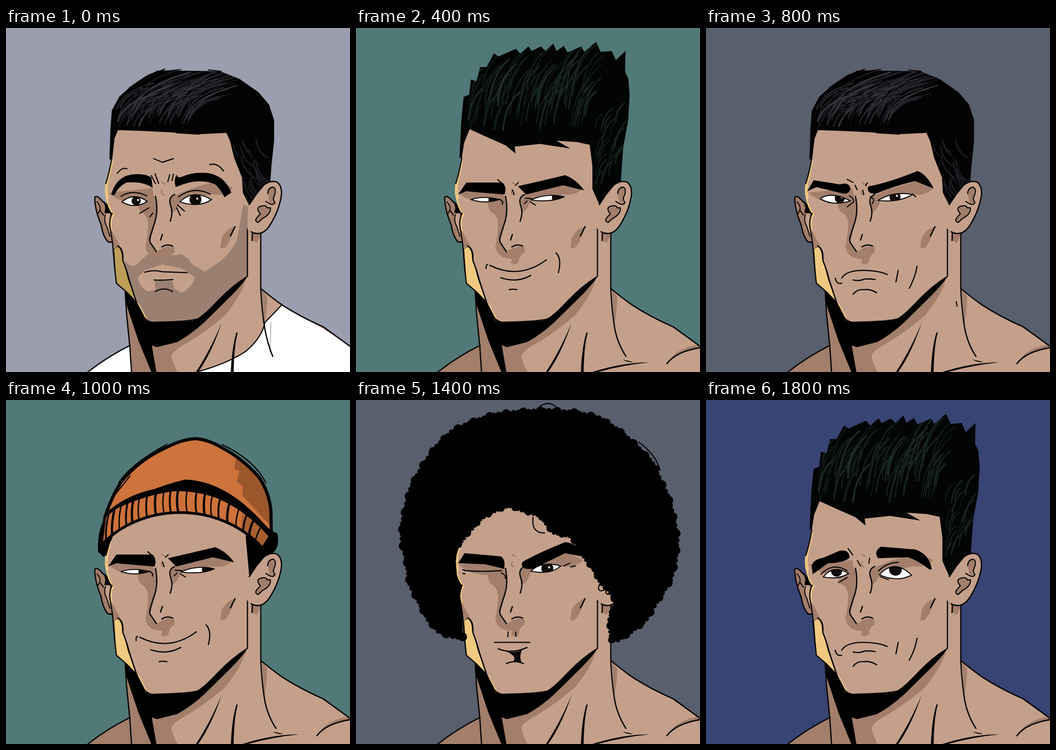
An HTML page with a canvas that plays this animation: 748x748 px, repeating every 2000 ms.

```html
<!DOCTYPE html>
<html lang="en">
<head>
<meta charset="utf-8">
<title>Portraits</title>
<style>
html, body { margin: 0; width: 100%; height: 100%; overflow: hidden; }
canvas { display: block; }
</style>
</head>
<body>
<canvas id="stage" width="748" height="748"></canvas>
<script>
const c = document.getElementById('stage').getContext('2d');
const INK = '#080606';
c.lineJoin = c.lineCap = 'round';

const fill = (color, d) => { c.fillStyle = color; c.fill(new Path2D(d)); };
const line = (d, width = 2.8, color = INK) => {
  c.lineWidth = width; c.strokeStyle = color; c.stroke(new Path2D(d));
};
const shape = (color, d, width) => { fill(color, d); line(d, width); };
const dot = (x, y, r, color) => {
  c.fillStyle = color; c.beginPath(); c.arc(x, y, r, 0, 7); c.fill();
};
const inside = (d, draw) => { c.save(); c.clip(new Path2D(d)); draw(); c.restore(); };
const bumps = (d, size, gap, color = '#000') => {
  c.setLineDash([0, gap]); line(d, size, color); c.setLineDash([]);
};
const seeded = s => () => (s = s * 16807 % 2147483647) / 2147483647;

const human = { base: '#c4a08b', shade: '#a27e6b', beard: '#9b8071', gold: '#efc97f', dimGold: '#bd9e58' };
const teal = { base: '#87b6b8', shade: '#649494', beard: '#688e90', gold: '#e6b776', dimGold: '#bd9d63' };

const JAW = 'M525 436L525 540Q490 562 462 592Q432 624 418 632Q405 638 318 640Q306 638 301 630L284 597';
const TEMPLE = 'M230 282Q228 305 219 332Q214 352 219 370Q222 390 232 403Q222 420 228 442';

function body({ base, shade }, shirt) {
  fill(shirt ? '#fff' : shade, 'M178 748Q220 715 270 690L275 748Z');
  fill(base, 'M258 560L300 450L554 440L555 568Q576 585 600 602Q640 628 690 650L748 692L748 748L273 748L269 690Z');
  fill(shade, 'M260 570L525 530Q520 572 476 625Q440 657 392 686Q358 704 360 716Q364 732 373 748L273 748L269 690Z');
  fill(shade, 'M556 568L568 584Q568 610 562 645ZM532 442L553 450L546 467L534 462Z');
  fill('#000', 'M258 570L284 597L303 636L318 640L405 637Q425 632 455 599Q490 562 525 540Q518 553 490 582L430 641Q400 668 372 683L328 694L317 690L327 748L316 748L288 680L262 602Z');
  if (shirt) {
    fill('#fff', 'M600 602Q582 624 563 642Q556 675 520 704Q480 730 415 748L748 748L748 692Q690 652 640 626Z');
    line('M600 602L563 640Q556 675 520 704Q480 730 415 748', 2.4);
    line('M576 640L574 705M491 724L489 748', 3, '#c9c9cb');
  } else {
    fill(shade, 'M748 688Q715 692 692 710L676 730Q695 704 748 697Z');
    line('M676 730Q695 704 748 695');
    fill(INK, 'M638 727Q580 727 514 748L526 748Q580 733 638 727ZM580 721L603 726Q590 728 580 721Z');
  }
  line('M178 748Q220 715 270 690M259 570L262 620L269 690L273 748');
  line('M554 448L554 568Q556 610 562 650Q568 685 ' + (shirt ? '580 714' : '587 714'));
  line('M556 568Q576 585 600 602Q640 628 690 650L748 692');
  fill(INK, 'M469 641Q448 705 418 748L413 748Q444 701 469 641ZM504 662Q496 690 495 748L489 748Q491 695 501 662Z');
}

function leftEar({ base, shade }) {
  shape(shade, 'M232 466L222 465Q211 454 207 428Q193 395 193 368Q198 362 211 378L228 392Z');
  fill(base, 'M225 400L216 408Q214 420 226 455Z');
  fill('#000', 'M212 376L229 390L227 403L214 402L216 391Z');
  line('M198 378Q207 388 204 396L200 404M204 396L212 407M216 406Q212 420 219 431L226 453', 2.2);
}

function rightEar({ base, shade }) {
  const rim = 'M529 384L545 360L560 342Q575 330 589 335Q600 342 599 362Q595 394 575 427Q557 456 533 443';
  fill(base, rim + 'L525 438L526 384Z');
  line(rim);
  fill(shade, 'M569 360Q572 345 582 346Q590 350 582 367L583 382L573 380ZM553 404Q541 390 556 388L573 391Q576 403 548 424Q540 415 553 404Z');
  line('M569 360Q570 347 581 346Q590 350 582 368Q580 374 585 379Q581 389 565 377M553 404Q541 390 556 387Q566 385 568 391L575 391Q576 405 558 414L548 423Q540 420 545 413Z', 2.4);
}

function face({ base, shade, beard, gold, dimGold }, bearded, lips) {
  fill(base, 'M230 282L240 215L490 215L518 260L532 384L533 443L525 436L525 540Q490 562 462 592Q432 624 418 632Q405 638 318 640L301 630L284 597L240 555L232 470L228 442Q222 420 232 403Q214 375 215 352Z');
  fill(shade, 'M286 376L322 366Q333 395 323 425L314 465L328 487Q345 473 366 475L367 488Q354 495 354 509Q345 517 337 511L340 502Q306 502 303 474Q311 440 308 418Q304 404 293 400Q286 390 286 376Z');
  fill(shade, 'M223 358L318 348L322 368L300 380Q250 384 223 358Z');
  fill(shade, 'M358 368L400 350L460 332L494 348Q478 366 450 362L380 375Q372 398 360 402Z');
  fill(shade, 'M498 432Q481 435 469 456L466 479L475 479Q488 466 498 432ZM230 440L233 478L248 473Z');
  if (bearded) {
    fill(beard, 'M516 384L528 388L525 540Q490 562 462 592Q432 624 418 632L318 640L301 630L268 552L258 505Q270 522 282 516L308 492L338 503L354 495L382 492Q398 500 405 514L432 530L465 508Q500 478 504 450Z');
    fill(base, 'M287 542L303 526L340 514L380 522L410 541Q409 560 382 576L366 567L362 550L323 550L325 569L308 573Q288 560 287 542Z');
  }
  if (lips) fill(shade, 'M297 531Q315 519 334 517L348 525L370 521L391 531Q340 522 297 531ZM319 549L366 549L363 572L326 576L330 564Z');
  line(TEMPLE, 3, gold);
  line('M231 290Q228 308 221 334Q218 354 222 370M234 404Q225 420 230 440M288 600L304 631', 3, gold);
  shape(bearded ? dimGold : gold, 'M235 480L243 475Q253 482 253 502L260 523L265 544L284 597L262 574L240 555Z', 1);
  line('M230 282Q226 310 217 338M231 403Q222 420 228 442L232 470L236 520L240 555L262 574L284 597', 2.6);
  line('M243 474Q256 480 254 505Q263 528 268 548L284 597', 2.8);
  line(JAW, 2.6);
  line('M367 362Q352 368 358 386Q364 402 357 420M325 366Q332 400 322 427L314 452Q310 463 316 470L327 486M340 449L336 461M339 476Q350 469 362 474M498 432L488 452M536 446L535 462');
}

const EXPRESSIONS = {
  wary: {
    brows: 'M229 362Q240 320 280 318Q302 316 316 325L319 348Q300 333 262 336Q245 344 235 364ZM371 319Q364 330 369 346Q418 324 455 340Q467 351 475 368L490 358Q475 319 435 315Q405 313 381 324Q374 327 371 319Z',
    eyes: [['M252 378Q278 356 307 377Q280 395 252 378Z', 283, 376, 10], ['M378 378Q407 350 447 373Q420 392 378 378Z', 412, 373, 13]],
    marks: 'M250 366Q275 350 306 365M375 367Q408 343 444 361M321 284L340 292L364 284M242 316Q252 302 263 306M443 297Q460 292 473 311M316 321L325 338M324 317L332 338M352 334L356 319M361 332L364 318M291 403L311 391M313 411L319 402M373 385L388 398M371 391L379 408'
  },
  stern: {
    brows: 'M220 355L234 331L291 340Q312 334 314 350Q310 365 290 358L240 346ZM355 344Q395 337 460 311Q480 318 495 349L455 333Q420 340 370 360Q350 362 352 346Z',
    eyes: [['M248 371Q273 354 314 376Q275 388 248 371Z', 291, 370, 11], ['M374 375Q407 354 449 362Q420 380 374 375Z', 411, 367, 12]],
    marks: 'M307 329L320 336M324 342L329 352M351 337L347 343M341 353L343 362M312 365Q322 370 321 378L307 389M357 367Q370 372 361 382M449 361L456 367M544 595L546 605'
  },
  sleepy: {
    brows: 'M217 353L235 332L310 341L323 367L270 358L225 357ZM383 340L455 331Q482 334 496 363L475 360L385 363Q366 360 373 343Z',
    eyes: [['M263 380Q290 370 321 375Q300 390 263 380Z', 291, 379, 10], ['M380 375Q410 365 448 375Q415 387 380 375Z', 411, 376, 11]],
    marks: 'M309 291Q333 294 345 302Q360 294 383 291M290 303Q327 303 345 312Q365 307 392 310M250 381L260 371M246 391L259 384M302 393L316 386M447 378L455 383M458 377L463 382M383 385L396 393'
  },
  sly: {
    brows: 'M222 362L240 336L315 336Q330 343 323 362L285 359L240 355ZM352 344L400 333L455 320Q480 330 496 353L450 342L370 362Z',
    eyes: [['M250 373Q280 364 311 373Q280 383 250 373Z', 299, 373, 11], ['M380 374Q415 358 453 367Q425 380 380 374Z', 438, 369, 12]],
    marks: 'M308 330L321 340M311 372Q322 377 318 383M353 336L347 342M340 352L344 362M366 382L372 376M379 378L390 385M368 370L382 371'
  },
  tired: {
    brows: 'M225 360L229 335Q265 323 303 318Q316 327 308 343L245 342L235 364ZM368 315Q358 325 367 338L440 336Q463 344 488 360L494 350Q475 325 450 317Z',
    eyes: [['M250 370Q280 347 309 372Q280 387 250 370Z', 290, 369, 11], ['M376 372Q408 342 449 362Q422 386 376 372Z', 414, 366, 13]],
    marks: 'M321 319L328 327M333 333L336 338M353 317L347 326M313 358Q324 362 321 369M311 369L317 377M233 385L242 379M236 374L242 370M361 371L369 376M463 361L474 361'
  },
  wink: {
    brows: 'M222 355L236 333L315 340Q326 347 322 367L280 357ZM362 352Q395 333 455 309Q485 312 490 340L455 333L385 367Q355 370 362 352Z',
    eyes: [['M380 372Q405 349 445 361Q423 381 380 372Z', 416, 366, 13]],
    marks: 'M236 371Q275 374 316 371M232 377L237 378M232 369L236 370M316 376Q326 380 325 388M451 361L465 355M467 363L477 361M331 504L330 515M347 505L348 514'
  },
  bored: {
    brows: 'M230 365Q228 348 255 343L290 328Q312 324 312 343Q300 354 265 355L232 379ZM380 319Q364 330 374 344L440 342Q462 350 485 368L491 369Q486 335 455 325Z',
    eyes: [['M255 385Q276 357 310 377Q290 391 255 385Z', 284, 372, 12], ['M377 380Q410 344 447 381Q415 397 377 380Z', 412, 368, 14]],
    marks: 'M250 379Q275 352 307 371M375 372Q392 354 418 353M309 323L319 337M329 349L336 361M356 344L354 355M288 397L307 386M379 384L397 391'
  }
};

const MOUTHS = {
  flat: 'M302 531Q320 525 340 530L394 532M322 548Q342 549 363 547M325 573Q343 562 362 573',
  frown: 'M295 544Q308 523 360 528Q382 530 394 536M281 544Q284 558 295 555M320 548Q334 551 344 546Q355 545 368 547M320 579Q328 567 345 569Q358 567 371 576M418 527L413 552M459 518Q455 542 442 566',
  smile: 'M291 516Q355 548 414 504M283 523Q282 515 286 514M315 543Q350 555 380 538M333 569Q341 567 350 569M435 489Q448 502 440 532',
  calm: 'M309 534Q326 524 360 528L394 528M329 549Q344 537 357 550',
  pout: 'M301 527L378 527M309 541Q340 553 372 538M327 573Q345 565 364 573'
};

function express(name, mouth, shade) {
  const { brows, eyes, marks } = EXPRESSIONS[name];
  for (const [lid, x, y, r] of eyes) {
    inside(lid, () => {
      c.fillStyle = '#fff'; c.fillRect(0, 300, 748, 150);
      dot(x, y, r, '#100b0a');
      if (name != 'sly' && name != 'bored') dot(x + 4, y - 2, 2.2, '#fff');
    });
    line(lid, 2.2);
  }
  fill('#000', brows);
  line('M339 336L346 340M340 352Q335 360 343 363', 3, shade);
  line(marks, 2.4);
  line(MOUTHS[mouth], 2.6);
  if (mouth == 'pout') fill(INK, 'M322 545Q340 552 361 544Q354 558 360 571L342 568Q352 556 322 545Z');
}

function strands(d, colors, count, x0, x1, y0, y1, dx, dy) {
  const rnd = seeded(77);
  inside(d, () => {
    for (let i = 0; i < count; i++) {
      const x = x0 + rnd() * (x1 - x0), y = y0 + rnd() * (y1 - y0), k = .5 + rnd() * .7;
      line(`M${x} ${y}q${dx * k * .15} ${dy * k * .7} ${dx * k} ${dy * k}`, 1 + rnd() * 2.5, colors[i % colors.length]);
    }
  });
}

const SLICK = 'M226 285L228 220L231 180L247 150L275 125L308 103L335 93L400 94L465 95L508 112L548 140L571 167L582 200L582 245L576 302L574 332L559 342L529 384L516 358L514 325L497 282L488 245L480 227L420 230L360 226L300 223L243 221L235 240L230 285Z';
const QUIFF = 'M225 282L229 200L234 150L246 145L250 112L262 116L270 85L284 85L300 55L310 62L348 45L357 56L375 40L382 50L402 40L412 50L429 34L436 50L452 39L460 53L490 40L496 52L522 30L532 52L556 50L565 70L586 50L585 95L592 110L595 145L592 200L581 260L576 332L560 342L529 384L514 350L514 300L508 254L480 248L436 245L466 262L400 252L345 258L347 273L325 255L280 235L247 220L235 250L230 282Z';
const SPIKES = 'M221 320L193 289L222 283L205 262L167 230L216 234L180 181L234 187L194 118L247 140L231 96L281 123L267 42L335 103L338 53L372 87L379 46L411 98L445 29L458 101L480 52L488 107L534 68L530 118L571 97L556 159L590 138L584 168L607 168L581 217L617 222L593 250L623 268L600 289L610 295L597 310L607 321L588 334L560 342L529 384L516 357L523 340L511 285L475 249L350 274L320 269L254 250L238 280Z';
const CROWN = 'M221 244L280 116Q360 76 445 84Q500 99 541 136L590 276Q490 204 400 204Q310 208 221 244Z';
const BRIM = 'M221 244Q310 208 400 204Q490 204 590 276Q624 312 638 362Q520 246 400 247Q260 247 163 326Q188 275 221 244Z';
const CAP = 'M235 206Q236 130 300 97Q380 65 490 80Q545 105 580 165Q590 220 572 311L500 245Q380 190 235 206Z';
const VISOR = 'M234 205Q193 214 194 248Q198 284 240 281Q340 250 440 273Q500 287 572 312L500 246Q365 178 234 205Z';
const AFRO = 'M232 515L214 515L180 503L156 475L141 445L118 402L111 350L101 312L101 272L109 232L121 188L146 143L174 103L210 68L248 50L302 32L360 26L415 23L480 28L528 39L570 66L605 96L643 136L665 183L679 213L689 252L698 300L694 350L683 392L654 437L629 479L596 504L568 522L555 522';
const HAIRLINE = 'L550 480L564 440L550 413L532 398L517 370L496 342L468 297L427 288L401 252L366 242L332 230L298 243L272 258L245 288L221 318';

const HATS = {
  slick: {
    front() {
      shape('#030304', SLICK, 2);
      strands(SLICK, ['#24242b', '#17171c', '#35353b'], 70, 240, 400, 170, 215, 120, -85);
      strands(SLICK, ['#1d1d23'], 26, 495, 545, 240, 350, 30, 45);
      line('M315 103L345 89M340 95L380 90M440 91L468 94M285 118L330 93M233 180L270 128M370 228L420 231', 2);
    }
  },
  quiff: {
    front() {
      fill('#030504', QUIFF);
      strands(QUIFF, ['#15241f', '#0e1715', '#1c2d27'], 90, 240, 500, 130, 225, 42, -95);
      strands(QUIFF, ['#15241f'], 24, 520, 565, 200, 340, 24, -50);
    }
  },
  bucket: {
    back() {
      fill('#000', 'M163 326Q142 350 147 372Q170 412 205 417L240 400L500 300L540 420L585 417Q635 415 643 383L637 360L520 246L300 240Z');
      fill('#000', 'M550 440L578 418Q595 440 580 470Q570 500 577 545Q552 525 553 490Z');
      line('M580 430q28 20 5 38M582 455q40 10 10 32q-15 8 -20 0M570 475q10 38 36 28M565 500q6 24 28 24', 2.5);
    },
    front() {
      fill('#66513f', 'M330 284Q385 262 425 250L487 260L502 301Q420 274 330 284Z');
      fill('#000', 'M163 326Q250 240 400 240Q450 245 500 262L590 300L620 345L560 342L529 384L517 350L497 278L480 262L430 255L425 276L400 280L375 268L350 276L340 258L310 258L290 270L270 268L240 305L220 330L215 370L180 365Z');
      for (let i = 0; i < 11; i++) {
        const x = 246 + i * 18, y = 278 + 10 * Math.sin(i * 2.1);
        line(`M${x - 12} ${y - 14}q-4 30 16 26q18 -2 14 -22`, 4 + i % 3);
      }
      fill('#5b4cc8', CROWN);
      inside(CROWN, () => {
        fill('#4235a1', 'M420 80L470 95L490 115L484 127L502 128L478 147L510 148L495 161L518 165L440 152L520 178L450 180L526 190L495 203L530 215L525 232L600 280L560 130L470 70Z');
        line('M227 240L278 130', 3, '#8a80e6');
      });
      fill('#3d3098', BRIM);
      inside(BRIM, () => fill('#251a79', 'M430 200L495 222L462 228L490 240L475 256L650 370L600 270Z'));
      line(CROWN, 4.5);
      line(BRIM, 2.5);
    }
  },
  cap: {
    back() {
      const tufts = 'M222 290Q195 315 196 350L202 366L225 365ZM224 458Q208 470 214 488L236 506ZM556 514Q575 516 588 488Q602 455 597 410L560 420Z';
      fill('#75491f', tufts);
      bumps(tufts, 4, 5, '#1c1008');
    },
    front() {
      const side = 'M514 303L560 305L594 327L592 336L560 342L529 384L516 352Z';
      fill('#7d4f26', side);
      line('M530 318L575 325M527 335L560 330M528 350L545 345', 5, '#99652f');
      bumps(side, 5, 5);
      fill('#438637', CAP);
      inside(CAP, () => {
        fill('#2a5f25', 'M440 76Q500 95 505 150Q510 205 498 246L575 315L600 160L500 76Z');
        line('M365 200Q370 120 400 82M300 190Q320 120 370 82M430 205Q445 140 430 82M270 150Q290 110 340 88M540 260Q552 180 520 110', 1.4, '#568f55');
        line('M241 204Q240 175 258 148', 5, '#78a9bd');
      });
      line(CAP, 5);
      fill('#000', VISOR);
      line('M295 273Q335 267 380 271M300 276L345 270', 1.5);
    }
  },
  beanie: {
    front() {
      const cubic = (a, b, p, q) => t => ((1 - t) ** 3 * a + 3 * t * (1 - t) ** 2 * b + 3 * t * t * (1 - t) * p + t ** 3 * q);
      const topX = cubic(215, 290, 450, 578), topY = cubic(252, 185, 155, 290);
      const lowX = cubic(207, 290, 460, 558), lowY = cubic(316, 225, 215, 322);
      const dome = 'M216 252Q232 205 252 176Q290 130 345 105Q380 86 412 84Q440 86 470 104Q515 128 550 168Q572 200 576 240L577 298C450 150 290 180 216 252Z';
      const cuff = 'M215 252C290 185 450 155 578 290L558 322C460 215 290 225 207 316Z';
      fill('#000', 'M212 262Q198 290 200 330L213 342L232 298ZM565 280L590 290Q596 320 580 333L560 342L529 384L521 295Z');
      fill('#ce733c', dome);
      inside(dome, () => fill('#9b562b', 'M484 118L500 128L496 150L508 154L502 178L515 188L514 208L600 300L590 180Z'));
      fill('#cd713a', cuff);
      inside(cuff, () => {
        fill('#a85f30', 'M515 220L510 300L580 340L600 270Z');
        for (let i = 1; i < 22; i++) {
          const t = i / 22 + .006 * Math.sin(i * 5);
          line(`M${topX(t)} ${topY(t)}Q${(topX(t) + lowX(t)) / 2 - 5} ${(topY(t) + lowY(t)) / 2} ${lowX(t)} ${lowY(t)}`, 3 + i % 3);
        }
      });
      line(dome, 7);
      line(cuff, 6);
      fill('#000', 'M222 246Q305 192 390 173Q485 176 575 285Q480 196 400 195Q305 200 222 246Z');
      line('M245 180Q270 140 350 96M237 206L270 165M470 97Q540 130 565 180', 2.5);
    }
  },
  spikes: {
    front() {
      fill('#34ad35', SPIKES);
      inside(SPIKES, () => {
        fill('#289329', 'M350 274Q385 242 450 236L500 230L513 241L545 210L580 200L640 230L620 340L520 390L500 255L475 249Z');
        fill('#2da02e', 'M440 128L475 95L530 112L555 160L530 170L490 130Z');
        fill('#25802a', 'M338 53L350 88L335 103ZM379 46L392 80L374 88ZM445 29L440 75L408 100ZM480 52L478 85L458 101ZM534 68L520 95L488 107ZM571 97L552 120L530 118Z');
        line('M170 230L222 270M183 183L218 232M196 121L232 185M234 98L247 136M270 46L278 118M196 290L222 317', 9, '#5fcf63');
      });
      line(SPIKES, 2.6);
    }
  },
  afro: {
    front() {
      fill('#000', AFRO + HAIRLINE + 'L217 350L220 390L231 403L225 430L231 470Z');
      bumps(AFRO, 12, 11);
      bumps(AFRO, 19, 37);
      bumps('M555 522' + HAIRLINE, 9, 9);
      bumps('M555 522' + HAIRLINE, 14, 31);
      line('M385 255q-4 35 25 34M400 14q20 -14 36 2M530 400q-8 18 8 14M545 405q18 0 12 18M615 92q36 25 46 60', 2.5);
    }
  }
};

const look = (bg, hat, mood, mouth, extra) => ({ bg, hat, mood, mouth, skin: human, ...extra });
const LOOKS = [
  look('#9b9eae', 'slick', 'wary', 'flat', { bearded: true, shirt: true }),
  look('#384473', 'bucket', 'stern', 'frown', { lips: true }),
  look('#517978', 'quiff', 'sly', 'smile'),
  look('#3f2b1a', 'cap', 'sleepy', 'smile', { lips: true }),
  look('#585f6d', 'slick', 'stern', 'frown'),
  look('#517978', 'beanie', 'sly', 'smile'),
  look('#573964', 'spikes', 'tired', 'calm', { bearded: true, skin: teal }),
  look('#585f6d', 'afro', 'wink', 'pout'),
  look('#573964', 'cap', 'tired', 'calm'),
  look('#384473', 'quiff', 'bored', 'frown')
];

function portrait({ bg, hat, mood, mouth, skin, bearded, shirt, lips }) {
  const { back, front } = HATS[hat];
  c.fillStyle = bg;
  c.fillRect(0, 0, 748, 748);
  if (back) back();
  body(skin, shirt);
  leftEar(skin);
  if (hat == 'afro') rightEar(skin);
  face(skin, bearded, lips);
  express(mood, mouth, skin.shade);
  front();
  if (hat != 'afro') rightEar(skin);
}

let shown = -1;
function tick() {
  const index = Math.floor(performance.now() % 2000 / 200);
  if (index != shown) portrait(LOOKS[shown = index]);
  requestAnimationFrame(tick);
}
tick();
</script>
</body>
</html>
```
